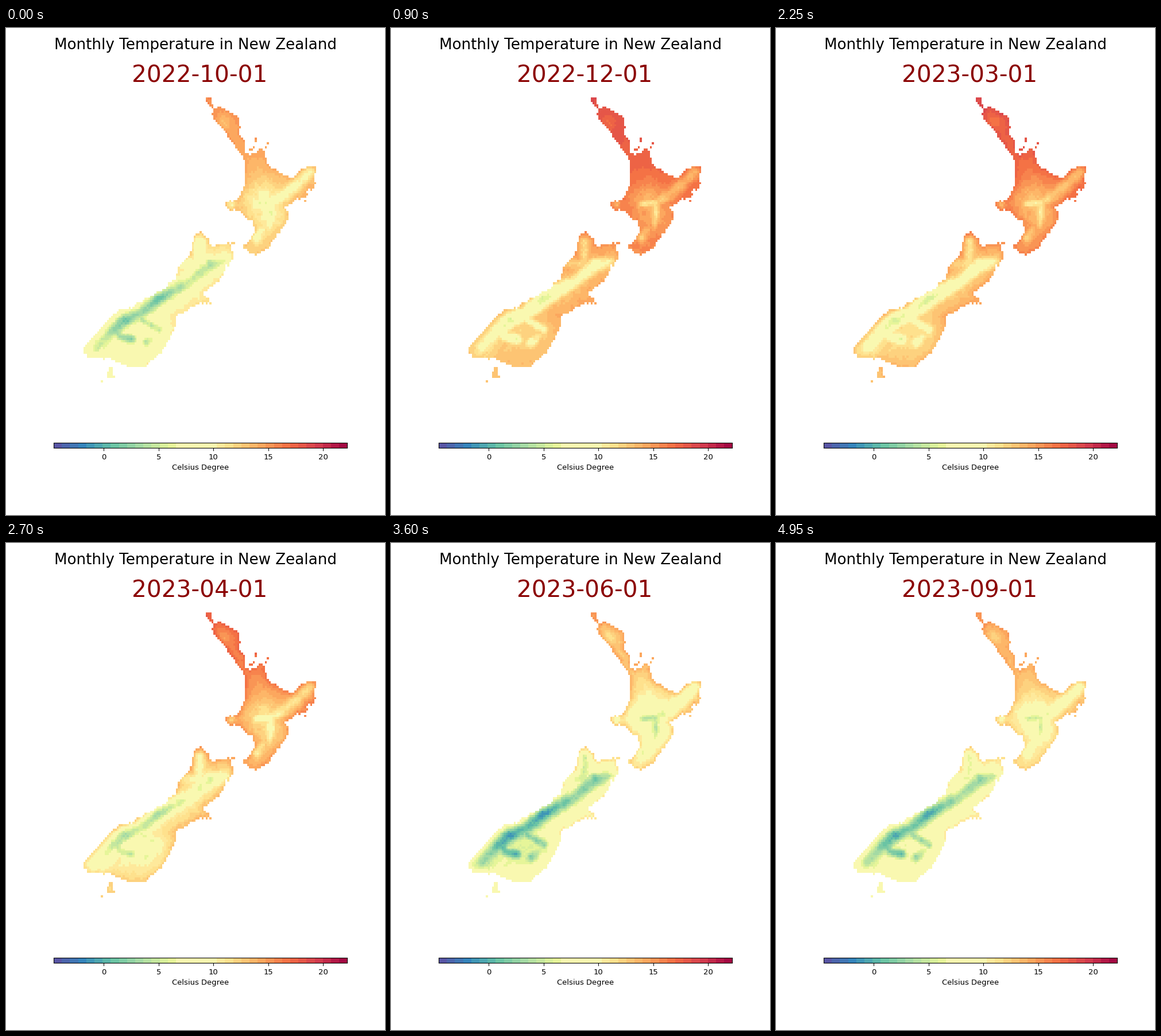
Write a matplotlib script that moves like this. It is 660 px wide and 849 px high and loops after 5.4 s.

```python
import numpy as np
import matplotlib.pyplot as plt
from matplotlib.animation import FuncAnimation
from matplotlib.colors import ListedColormap, Normalize, to_rgba
from matplotlib.path import Path

W, H, DPI = 660, 849, 96
PT = 94.3 / DPI               # point size correction
X0, Y0 = 82.5, 121.3          # left and top edge of the cell grid
CW, CH = 3.433, 3.88          # cell size in pixels
COLS, ROWS = 149, 128
T_MIN, T_MAX = -4.61, 22.19

# Key points of each coast, in pixels
NORTHLAND = [
    (347, 120), (358, 120), (355, 130), (364, 141), (371, 137), (388, 147),
    (405, 156), (407, 174), (404, 184), (414, 196), (416, 222), (409, 222),
    (401, 211), (387, 190), (370, 170), (358, 152), (361, 144), (347, 128)]
NORTH = [
    (410, 221), (437, 218), (440, 208), (447, 210), (456, 241), (490, 260),
    (501, 261), (512, 247), (526, 240), (544, 244), (537, 255), (536, 279),
    (524, 284), (522, 295), (505, 298), (486, 313), (491, 323), (489, 338),
    (458, 380), (436, 398), (410, 385), (432, 357), (429, 338), (405, 319),
    (385, 317), (380, 304), (402, 299), (416, 275), (416, 240)]
SOUTH = [
    (339, 352), (344, 362), (354, 366), (356, 383), (375, 376), (389, 375),
    (397, 404), (388, 408), (370, 441), (343, 464), (360, 481), (337, 480),
    (296, 502), (293, 523), (284, 541), (273, 562), (239, 592), (213, 591),
    (178, 577), (146, 575), (131, 563), (143, 546), (165, 524), (194, 492),
    (212, 490), (275, 453), (294, 438), (299, 418), (320, 393), (326, 363)]
STEWART = [(178, 592), (185, 592), (187, 606), (192, 611), (174, 612)]
SPECKS = [(443, 207, 4), (390, 378, 3), (438, 192, 2), (428, 212, 2),
          (521, 300, 1), (169, 615, 2)]

# Mountain chains: half width, then (x, y, height in km)
SPINE = [(378, 409, 1.0), (355, 413, 1.4), (322, 440, 1.15), (265, 472, 1.95),
         (235, 497, 1.35), (205, 510, 1.8), (176, 537, 1.05), (159, 556, .95)]
CHAINS = [
    (10, SPINE),
    (21, [(x, y, .5) for x, y, _ in SPINE]),
    (7, [(192, 525, 1.4), (197, 538, 1.2), (218, 542, 1.5)]),
    (6, [(236, 508, 1.1), (265, 525, 1.0)]),
    (7, [(243, 548, 1.1), (255, 538, .7)]),
    (25, [(200, 535, .4), (250, 530, .4)]),
    (8, [(336, 375, .9), (336, 410, .7), (308, 412, .6)]),
    (8, [(528, 252, .65), (485, 290, .75), (462, 303, .9)]),
    (6, [(438, 306, 1.15), (460, 306, 1.2), (460, 328, 1.05), (457, 345, .5)]),
    (24, [(448, 300, .6), (455, 320, .5)]),
    (6, [(436, 366, .75), (444, 352, .45)]),
    (6, [(392, 307, .5)]),
    (9, [(378, 163, .25)]),
]

# Sea-level temperature at the northern tip, October to September
TIP = [15.6, 17, 18.6, 19.6, 20.2, 18.8, 17.8, 16.8, 15, 14, 13.5, 15.1]

rng = np.random.default_rng(4)
gx, gy = np.meshgrid(X0 + CW * (np.arange(COLS) + .5),
                     Y0 + CH * (np.arange(ROWS) + .5))


def neighbours(a):
    """The grid and its four shifted copies."""
    return [a] + [np.roll(a, s, axis) for s in (-1, 1) for axis in (0, 1)]


def land_mask():
    pts = np.column_stack([gx.ravel(), gy.ravel()])
    rough = pts + rng.uniform(-1.5, 1.5, pts.shape)
    mask = np.zeros(gx.size, bool)
    for coast, where in ((NORTHLAND, pts), (NORTH, rough),
                         (SOUTH, rough), (STEWART, pts)):
        mask |= Path(coast).contains_points(where)
    mask = mask.reshape(gx.shape)
    for x, y, count in SPECKS:
        for dx, dy in rng.normal(0, count - 1, (count, 2)) * 2:
            row = min(int((y + dy - Y0) / CH), ROWS - 1)
            mask[row, int((x + dx - X0) / CW)] = True
    return mask


def inland(mask):
    """0 at the shore, approaching 1 deep inland."""
    depth, core = np.zeros(mask.shape), mask
    for _ in range(9):
        core = np.logical_and.reduce(neighbours(core))
        depth += core
    return 1 - np.exp(-depth / 2)


def elevation():
    height = np.zeros(gx.shape)
    for width, chain in CHAINS:
        chain = np.array(chain, float)
        knots = np.arange(len(chain))
        steps = np.linspace(0, len(chain) - 1, 12 * len(chain) - 11)
        for x, y, top in zip(*(np.interp(steps, knots, c) for c in chain.T)):
            d2 = (gx - x) ** 2 + (gy - y) ** 2
            height = np.maximum(height, top * np.exp(-d2 / (2 * width ** 2)))
    bumps = np.mean(neighbours(rng.normal(0, 1, gx.shape)), axis=0)
    return height + bumps * (.04 + .12 * np.minimum(height, 1))


def palette(levels=36):
    mid = (np.arange(levels) + .5) / levels
    colors = plt.get_cmap("Spectral_r")(mid)
    temps = T_MIN + mid * (T_MAX - T_MIN)
    colors[(temps > 6.5) & (temps < 10)] = to_rgba("#f9f8b0")
    return ListedColormap(colors)


LAND = land_mask()
SHORE = inland(LAND)
HEIGHT = elevation()
SOUTHING = (gy - Y0) / (ROWS * CH)
CMAP, NORM = palette(), Normalize(T_MIN, T_MAX)


def season(month, peak):
    return np.cos(2 * np.pi * (month - peak) / 12)


def temperature(i):
    """Cooler southwards, uphill, and inland in winter."""
    month = 10 + i
    shift = 1.1 * season(month, 12.3) - 1.1
    lapse = 5.2 - .7 * season(month, 13.6)
    t = TIP[i] - 5.6 * SOUTHING + shift * SHORE - lapse * HEIGHT
    return np.ma.array(t, mask=~LAND)


def month_label(i):
    year, month = divmod(9 + i, 12)
    return f"{2022 + year}-{month + 1:02d}-01"


fig = plt.figure(figsize=(W / DPI, H / DPI), dpi=DPI, facecolor="white")
stage = fig.add_axes([0, 0, 1, 1])
stage.axis("off")
field = stage.imshow(temperature(0), cmap=CMAP, norm=NORM,
                     interpolation="nearest", aspect="auto",
                     extent=(X0, X0 + COLS * CW, Y0 + ROWS * CH, Y0))
stage.set_xlim(0, W)
stage.set_ylim(H, 0)
stage.text(329.6, 17.4, "Monthly Temperature in New Zealand",
           ha="center", va="top", fontsize=19.95 * PT)
date = stage.text(337.4, 94, month_label(0), ha="center", va="baseline",
                  fontsize=31 * PT, color="darkred")

bar = fig.add_axes([82.5 / W, 1 - 732 / H, 511.5 / W, 9 / H])
bar.imshow(np.linspace(T_MIN, T_MAX, 1024)[None], cmap=CMAP, norm=NORM,
           aspect="auto", interpolation="nearest",
           extent=(T_MIN, T_MAX, 0, 1))
bar.set_yticks([])
bar.set_xticks(range(0, 21, 5))
bar.tick_params(labelsize=10 * PT, length=3.5 * PT, width=.8 * PT, pad=3.8 * PT)
bar.set_xlabel("Celsius Degree", fontsize=10 * PT, labelpad=4 * PT)
for edge in bar.spines.values():
    edge.set_linewidth(.8 * PT)


def update(i):
    date.set_text(month_label(i))
    field.set_data(temperature(i))
    return field, date


anim = FuncAnimation(fig, update, frames=len(TIP), interval=450,
                     repeat=True, repeat_delay=0, blit=False)
plt.show()
```
